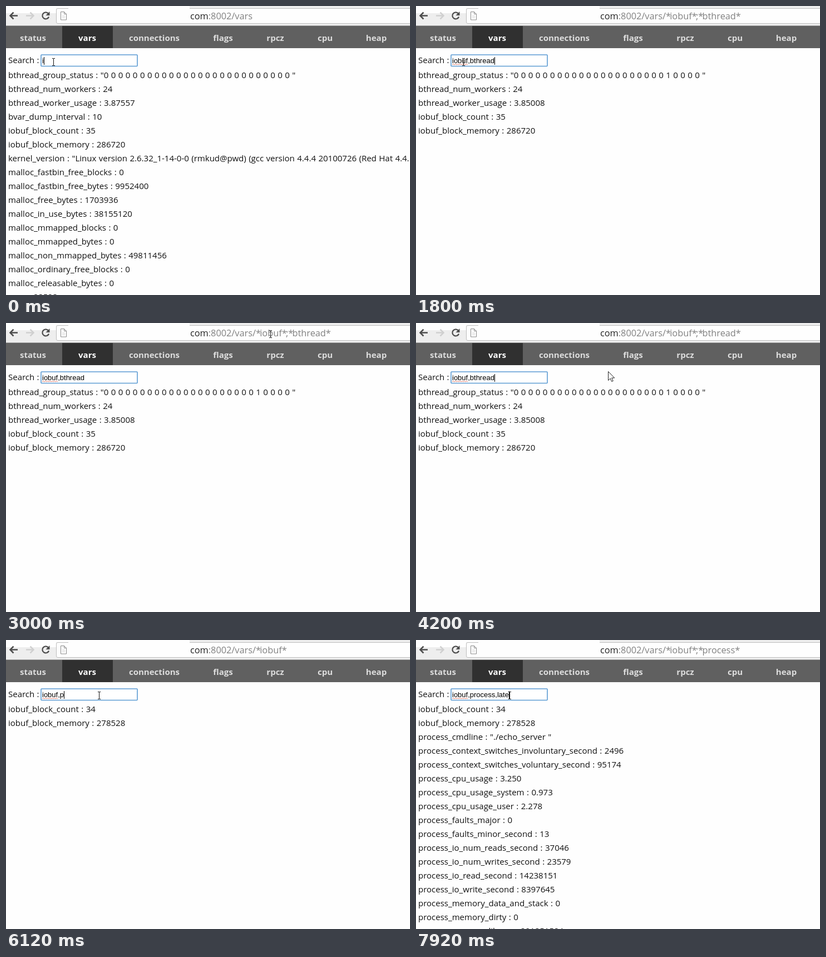
Animation of 726x521 px, one loop 8000 ms. Source, as an HTML page:

```html
<!DOCTYPE html>
<html lang="en">
<head>
<meta charset="utf-8">
<title>Variable search</title>
<style>
  html, body { margin: 0; width: 100%; height: 100%; overflow: hidden; background: #fff; }
  svg { display: block; width: 726px; height: 521px; }
  text { font-family: "Open Sans", "Noto Sans", sans-serif; white-space: pre; }
  .page { font-size: 15px; word-spacing: .55px; fill: #111; }
  .tabs { font-size: 15px; font-weight: 700; fill: #ddd; text-anchor: middle; }
  .tabs .active { fill: #fff; }
  .url { font-size: 16.3px; fill: #808080; }
  .url .host { fill: #222; }
  .url .star { letter-spacing: -1.7px; }
  #typed { font: 13px "Liberation Sans", Arial, sans-serif; fill: #000; }
</style>
</head>
<body>
<svg viewBox="0 0 726 521">
  <rect width="726" height="521" fill="#fefefe"/>

  <g id="toolbar" fill="none">
    <rect width="726" height="35" fill="#eee"/>
    <rect width="330" height="4" fill="#fefefe"/>
    <rect width="90" height="13" fill="#fefefe"/>
    <path d="M726 4.500H93q-2.500 0-2.500 2.500V29q0 2.500 2.500 2.500H726" fill="#fefefe" stroke="#bdbdbd"/>
    <rect x="112" width="218" height="31" fill="#fefefe"/>
    <rect y="35" width="726" height="1" fill="#aaa"/>
    <path d="M21 17.500H8M13.500 11.500l-6 6 6 6" stroke="#4d4d4d" stroke-width="2.500"/>
    <path d="M36 17.500H49M43.500 11.500l6 6-6 6" stroke="#d0d0d0" stroke-width="2.500"/>
    <path d="M76 13.500A6 6 0 1 0 77 19.500" stroke="#4d4d4d" stroke-width="2.300"/>
    <path d="M78.500 10v7h-7z" fill="#4d4d4d"/>
    <path d="M98.500 10.500h6l4 4v10.500h-10zM104.500 10.500v4h4" fill="#fff" stroke="#8a8a8a"/>
    <path d="M101 17.500h5M101 19.500h5M101 21.500h5" stroke="#ddd"/>
  </g>
  <text class="url" x="331" y="24"><tspan class="host">com</tspan>:8002/vars<tspan id="path"></tspan></text>

  <g class="tabs">
    <rect y="36" width="726" height="40" fill="#606060"/>
    <rect x="101" y="36" width="91" height="40" fill="#303030"/>
    <text x="48.500" y="63">status</text>
    <text x="146" y="63" class="active">vars</text>
    <text x="266.500" y="63">connections</text>
    <text x="390" y="63">flags</text>
    <text x="484" y="63">rpcz</text>
    <text x="573.500" y="63">cpu</text>
    <text x="665.500" y="63">heap</text>
  </g>

  <text class="page" x="4" y="103">Search :</text>
  <rect x="63" y="88" width="173" height="20.500" rx="1" fill="#fff" stroke="#5c9bd3" stroke-width="1.600"/>
  <path id="squiggle" fill="none" stroke="#e0604f" stroke-width=".8"/>
  <text id="typed" x="65" y="103"></text>
  <rect id="caret" y="92" width="1" height="14"/>

  <g id="rows" class="page"></g>

  <path id="beam" d="M-2.500-6.500h2l.5.500.5-.500h2M0-6V6M-2.500 6.500h2l.5-.500.5.500h2" fill="none" stroke="#111"/>
  <path id="arrow" d="M.5.500v16l3.700-3.500 2.500 5.500 2.500-1.100-2.500-5.400h5z" fill="#fff" stroke="#222"/>
</svg>
<script>
const LOOP = 8000, STEP = 120, BLINK = 400, ROWS = 17;
const $ = id => document.getElementById(id);

const status = (index, value) => {
  const slots = Array(26).fill(0);
  if (value) slots[index] = value;
  return `"${slots.join(' ')} "`;
};

// Name followed by its value at each successive sample; the last one holds.
const vars = [
  ['bthread_group_status', status(), status(21, 1), status(14, 3)],
  ['bthread_num_workers', 24],
  ['bthread_worker_usage', '3.87557', '3.85008', '3.83062'],
  ['bvar_dump_interval', 10],
  ['iobuf_block_count', 35, 35, 34],
  ['iobuf_block_memory', 286720, 286720, 278528],
  ['kernel_version', '"Linux version 2.6.32_1-14-0-0 (rmkud@pwd) (gcc version 4.4.4 20100726 (Red Hat 4.4.'],
  ['malloc_fastbin_free_blocks', 0],
  ['malloc_fastbin_free_bytes', 9952400],
  ['malloc_free_bytes', 1703936],
  ['malloc_in_use_bytes', 38155120],
  ['malloc_mmapped_blocks', 0],
  ['malloc_mmapped_bytes', 0],
  ['malloc_non_mmapped_bytes', 49811456],
  ['malloc_ordinary_free_blocks', 0],
  ['malloc_releasable_bytes', 0],
  ['pgrp', 23523],
  ['process_cmdline', '"./echo_server "'],
  ['process_context_switches_involuntary_second', 2110, 2110, 2110, 2110, 2496],
  ['process_context_switches_voluntary_second', 95090, 95090, 95090, 95090, 95174],
  ['process_cpu_usage', '3.239', '3.239', '3.239', '3.239', '3.250'],
  ['process_cpu_usage_system', '0.935', '0.935', '0.935', '0.935', '0.973'],
  ['process_cpu_usage_user', '2.304', '2.304', '2.304', '2.304', '2.278'],
  ['process_faults_major', 0],
  ['process_faults_minor_second', 6, 6, 6, 6, 13],
  ['process_io_num_reads_second', 36469, 36469, 36469, 36469, 37046],
  ['process_io_num_writes_second', 23876, 23876, 23876, 23876, 23579],
  ['process_io_read_second', 13973125, 13973125, 13973125, 13973125, 14238151],
  ['process_io_write_second', 8300321, 8300321, 8300321, 8300321, 8397645],
  ['process_memory_data_and_stack', 0],
  ['process_memory_dirty', 0],
  ['process_memory_library', 291251584]
];

// Start time and keys, one per step; "<" is backspace.
const strokes = [
  [0, 'iobuf'], [840, ',bthread'], [5040, '<<'], [5400, '<<<<<'],
  [6120, 'proce'], [6840, 'ss'], [7200, ','], [7440, 'late']
];

// Time, search terms, sample.
const results = [
  [0, '', 0], [720, 'iobuf', 0], [1320, 'iobuf,bth', 1], [1680, 'iobuf,bthread', 1],
  [5280, 'iobuf,bthre', 2], [5640, 'iobuf,bth', 2], [5880, 'iobuf,b', 2],
  [6120, 'iobuf', 2], [6360, 'iobuf,pr', 3], [6600, 'iobuf,proc', 3],
  [7080, 'iobuf,process', 4]
];

// Pointer: time, x, y.
const pointer = [
  [0, 85, 101], [1920, 85, 101], [2520, 345, 24], [3000, 475, 20],
  [3480, 560, 18], [4200, 345, 87], [4800, 167, 100], [8000, 168, 100]
];

const rows = Array.from({ length: ROWS }, (_, i) => {
  const row = document.createElementNS('http://www.w3.org/2000/svg', 'text');
  row.setAttribute('x', 4);
  row.setAttribute('y', 130 + 25 * i);
  return $('rows').appendChild(row);
});

$('squiggle').setAttribute('d', 'M65 106' + Array.from({ length: 14 }, (_, i) => `l2 ${i % 2 ? 1.5 : -1.5}`).join(''));

function inputAt(t) {
  let text = '', last = 0;
  for (const [start, keys] of strokes) {
    [...keys].forEach((key, i) => {
      const at = start + i * STEP;
      if (at > t) return;
      text = key === '<' ? text.slice(0, -1) : text + key;
      last = at;
    });
  }
  return { text, last };
}

function pointerAt(t) {
  const i = pointer.findIndex(p => p[0] > t);
  const [t0, x0, y0] = pointer[i - 1], [t1, x1, y1] = pointer[i];
  const k = (t - t0) / (t1 - t0), ease = k * k * (3 - 2 * k);
  return [x0 + (x1 - x0) * ease, y0 + (y1 - y0) * ease];
}

function showResult([, query, sample]) {
  const terms = query.split(',');
  $('path').innerHTML = query && '/' + terms
    .map(term => `<tspan class="star">*</tspan>${term}<tspan class="star">*</tspan>`).join(';');
  const found = vars.filter(([name]) => terms.some(term => name.includes(term)));
  rows.forEach((row, i) => {
    if (!found[i]) return row.textContent = '';
    const [name, ...values] = found[i];
    row.textContent = `${name} : ${values[Math.min(sample, values.length - 1)]}`;
  });
}

function showInput(t) {
  const { text, last } = inputAt(t);
  const field = $('typed');
  field.textContent = text;
  const on = Math.floor((t - last) / BLINK) % 2 === 0;
  $('caret').setAttribute('x', Math.round(65 + field.getComputedTextLength()));
  $('caret').setAttribute('visibility', on ? 'visible' : 'hidden');
  $('squiggle').setAttribute('visibility', text.includes(',') ? 'visible' : 'hidden');
}

function showPointer(t) {
  const [x, y] = pointerAt(t).map(Math.round);
  const overField = x > 62 && x < 237 && y > 87 && y < 110;
  const beam = overField || y < 31;
  for (const [id, shown, shift] of [['beam', beam, .5], ['arrow', !beam, 0]]) {
    $(id).setAttribute('transform', `translate(${x + shift} ${y})`);
    $(id).setAttribute('visibility', shown ? 'visible' : 'hidden');
  }
}

let shown = -1;
function draw() {
  const t = Math.floor(performance.now() % LOOP / STEP) * STEP;
  if (t !== shown) {
    shown = t;
    showResult(results.filter(r => r[0] <= t).pop());
    showInput(t);
    showPointer(t);
  }
  requestAnimationFrame(draw);
}
draw();
</script>
</body>
</html>
```
